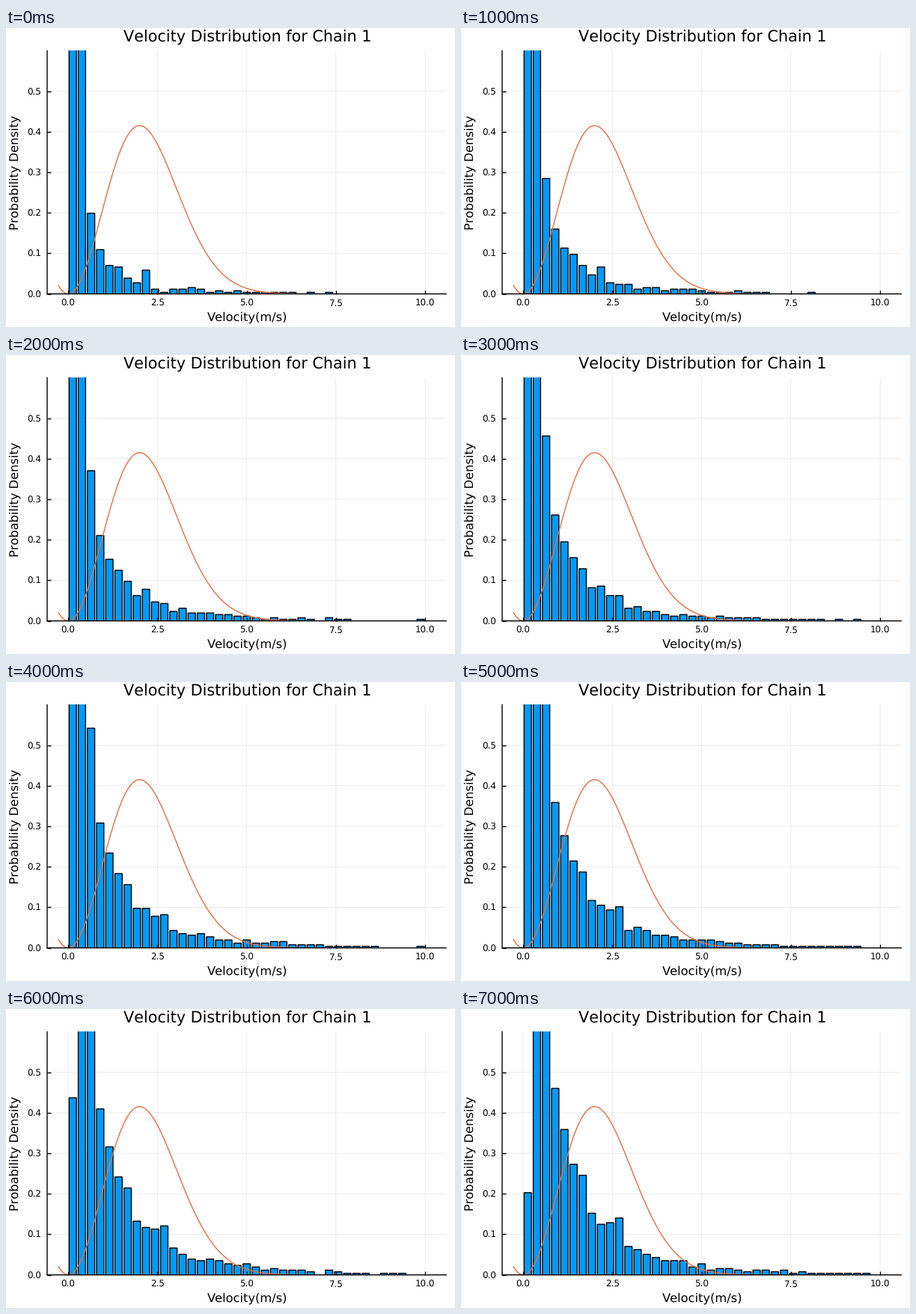
Write a matplotlib script that moves like this. It is 600x400 px and loops after 8000 ms.

```python
import numpy as np
import matplotlib.pyplot as plt
from matplotlib.animation import FuncAnimation

W, H, DPI = 600, 400, 100
PX = 72 / DPI                                   # one pixel in points
LINE = 1.39 * PX
LEFT, RIGHT, TOP, BOTTOM = 55, 588.2, 30.4, 355.7
X_MIN, X_MAX, Y_MAX = -0.589, 10.589, 0.6
BINS, SPAN, SAMPLES, FRAMES = 39, 10, 1000, 8
STEP = SPAN / BINS

plt.rcParams.update({"font.family": "DejaVu Sans", "text.hinting": "none",
                     "text.kerning_factor": 6})

# Particle counts of bins 2 to 10 at the first and the last step.
START = np.array([51, 28, 18, 17, 10, 7, 15, 3, 1])
END = np.array([205, 118, 92, 70, 63, 39, 32, 33, 36])


def build_counts():
    """Slow bins drain or fill steadily, fast ones follow a noisy decay."""
    rng = np.random.default_rng(4)
    counts = np.zeros((FRAMES, BINS))
    tail = np.arange(11, BINS)
    for k in range(FRAMES):
        t = k / (FRAMES - 1)
        counts[k, 0] = 472 - 60 * k
        counts[k, 1] = 200
        counts[k, 2:11] = np.round(START + (END - START) * t)
        rate = (3.5 + 12.5 * t) * np.exp(-(tail - 11) / 8)
        counts[k, 11:] = np.round(rate + rng.normal(0, 0.4 * np.sqrt(rate)))
    return counts.clip(0)


def maxwell(v, a=np.sqrt(2)):
    return np.sqrt(2 / np.pi) * v**2 / a**3 * np.exp(-v**2 / (2 * a**2))


def label(x, y, text, size, **kw):
    """Text at a pixel position counted from the top left."""
    kw = {"ha": "center", "va": "baseline", **kw}
    fig.text(x / W, 1 - y / H, text, fontsize=size * PX, **kw)


heights = build_counts() / (SAMPLES * STEP)
centers = (np.arange(BINS) + 0.5) * STEP

fig = plt.figure(figsize=(W / DPI, H / DPI), dpi=DPI, facecolor="white")
ax = fig.add_axes([LEFT / W, 1 - BOTTOM / H, (RIGHT - LEFT) / W, (BOTTOM - TOP) / H])
ax.set(xlim=(X_MIN, X_MAX), ylim=(0, Y_MAX))
ax.set_axisbelow(False)
ax.spines[["top", "right"]].set_visible(False)
ax.spines[["left", "bottom"]].set(linewidth=LINE, zorder=4, snap=False)

x_ticks = np.arange(0, 10.1, 2.5)
y_ticks = np.arange(6) / 10
ax.set_xticks(x_ticks)
ax.set_yticks(y_ticks)
ax.tick_params(direction="in", length=5 * PX, width=LINE,
               labelbottom=False, labelleft=False)
for tick in ax.xaxis.get_major_ticks() + ax.yaxis.get_major_ticks():
    tick.tick1line.set_snap(False)

grid = dict(color="black", alpha=0.1, lw=LINE / 2, zorder=0.5, snap=False)
for v in x_ticks:
    ax.axvline(v, **grid)
    x = LEFT + (v - X_MIN) / (X_MAX - X_MIN) * (RIGHT - LEFT)
    label(x, 371.6, f"{v:.1f}", 11.87)
for p in y_ticks:
    ax.axhline(p, **grid)
    y = BOTTOM - p / Y_MAX * (BOTTOM - TOP)
    label(47.3, y + 4.8, f"{p:.1f}", 11.87, ha="right")

label(322.5, 18.3, "Velocity Distribution for Chain 1", 20.75)
label(322.5, 392, "Velocity(m/s)", 16.3)
label(16.4, 193.3, "Probability Density", 16.3, rotation=90, rotation_mode="anchor")

bars = ax.bar(centers, heights[0], width=0.8 * STEP, color="#009afa",
              edgecolor="black", linewidth=LINE, zorder=1, snap=False)
speed = np.linspace(-0.273, 10.273, 400)
ax.plot(speed, maxwell(speed), color="#e26f46", lw=LINE, zorder=2, snap=False)


def update(k):
    for bar, h in zip(bars, heights[k]):
        bar.set_height(h)
    return list(bars)


anim = FuncAnimation(fig, update, frames=FRAMES, interval=1000,
                     repeat=True, repeat_delay=0, blit=False)
plt.show()
```
